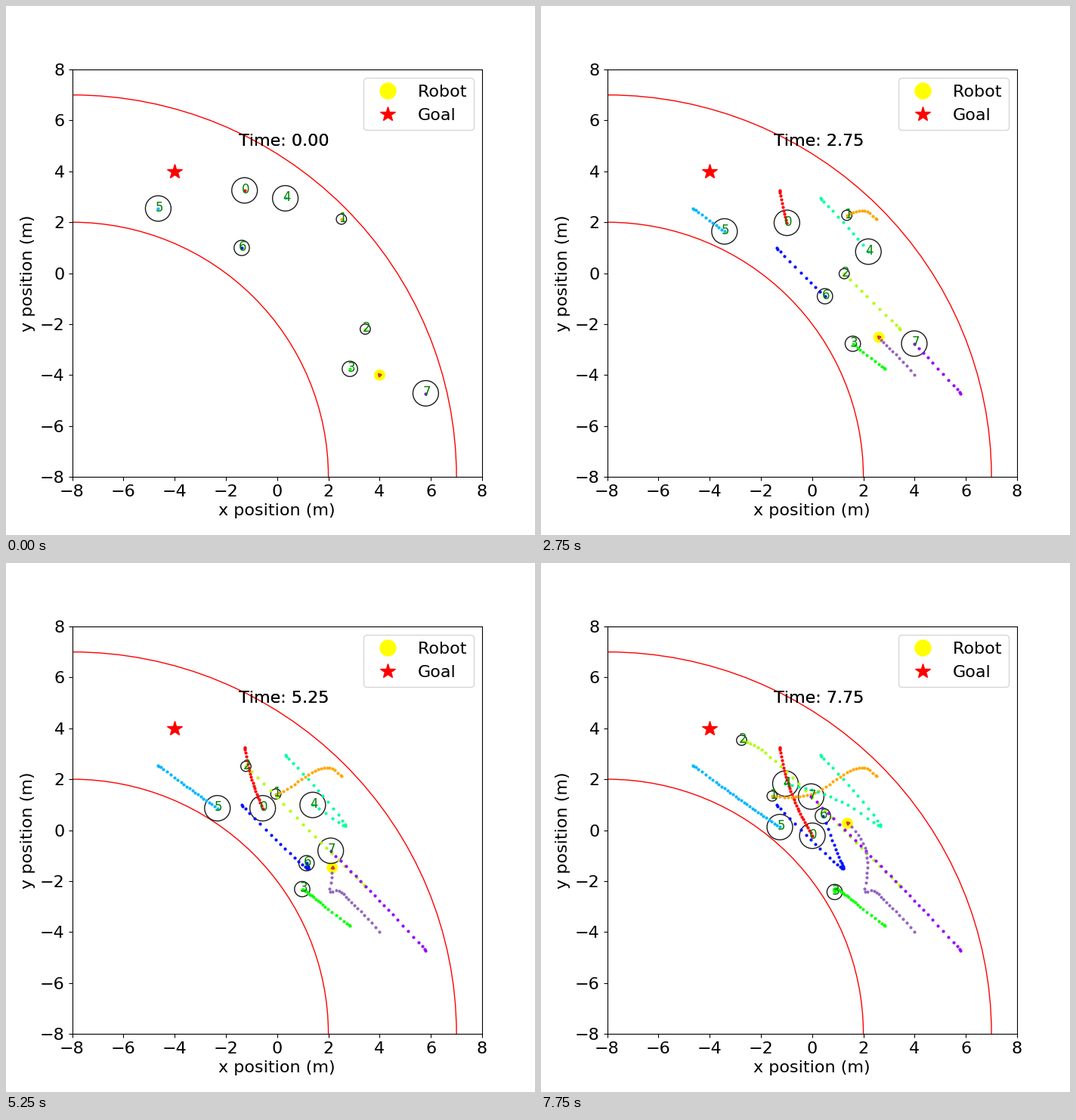
A matplotlib script that plays this animation: 700 by 700 pixels, repeating every 8000 ms.

```python
import numpy as np
import matplotlib.pyplot as plt
from matplotlib.animation import FuncAnimation

STEPS = 32
STEP_MS = 250

# Match the whole-pixel kerning of the text.
plt.rcParams["text.kerning_factor"] = 6


def walk(*keys, from_rest=True):
    """Smooth path through a few (step, x, y) keys, sampled at every step."""
    keys = np.array(keys, float)
    times, points = keys[:, 0], keys[:, 1:]
    slopes = np.gradient(points, times, axis=0, edge_order=2)
    if from_rest:
        slopes[0] = 0
    steps = np.arange(STEPS)
    i = np.clip(np.searchsorted(times, steps, side="right") - 1,
                0, len(times) - 2)
    span = (times[i + 1] - times[i])[:, None]
    u = (steps - times[i])[:, None] / span
    return ((1 + 2 * u) * (1 - u) ** 2 * points[i]
            + u * (1 - u) ** 2 * span * slopes[i]
            + u ** 2 * (3 - 2 * u) * points[i + 1]
            + u ** 2 * (u - 1) * span * slopes[i + 1])


# Each human: radius and path, in metres.
humans = [
    (.5, walk((0, -1.27, 3.25), (8, -1.08, 2.32), (31, .01, -.22))),
    (.2, walk((0, 2.51, 2.12), (4, 2.15, 2.42), (8, 1.72, 2.42),
              (21, -.05, 1.42), (31, -1.56, 1.34))),
    (.2, walk((0, 3.44, -2.2), (8, 1.92, -.7), (25, -1.98, 3.15),
              (31, -2.75, 3.53))),
    (.3, walk((0, 2.84, -3.76), (8, 1.87, -3), (19, 1.06, -2.36),
              (31, .88, -2.43))),
    (.5, walk((0, .32, 2.94), (8, 1.59, 1.57), (15, 2.66, .16),
              (21, 1.39, .99), (31, -1.04, 1.83))),
    (.5, walk((0, -4.64, 2.54), (8, -3.75, 1.88), (31, -1.26, .12))),
    (.3, walk((0, -1.38, .99), (8, -.04, -.37), (15, 1.09, -1.45),
              (25, .92, -.76), (31, .42, .56))),
    (.5, walk((0, 5.8, -4.72), (8, 4.51, -3.32), (31, -.04, 1.32))),
]
robot_path = walk((0, 4, -4), (8, 2.9, -2.83), (14, 2.31, -2.37),
                  (16, 2.06, -2.42), (19, 2.13, -1.86), (25, 2.06, -.7),
                  (31, 1.38, .27), from_rest=False)
velocity = np.gradient(robot_path, axis=0)
headings = np.degrees(np.arctan2(velocity[:, 1], velocity[:, 0]))

fig, ax = plt.subplots(figsize=(7, 7), dpi=100)
fig.subplots_adjust(left=.125, right=.9, bottom=.11, top=.88)
ticks = range(-8, 9, 2)
ax.set(xlim=(-8, 8), ylim=(-8, 8), xticks=ticks, yticks=ticks)
ax.tick_params(labelsize=16)
ax.set_xlabel("x position (m)", fontsize=16)
ax.set_ylabel("y position (m)", fontsize=16)

# Corridor walls
for r in (10, 15):
    ax.add_patch(plt.Circle((-8, -8), r, fill=False, ec="red", lw=1))

goal, = ax.plot([-4], [4], "*", color="red", ms=15, label="Goal")
robot_key = plt.Line2D([], [], color="yellow", marker="o", ls="", ms=15,
                       label="Robot")
ax.legend(handles=[robot_key, goal], fontsize=16, loc="upper right")

robot = ax.add_patch(plt.Circle(robot_path[0], .2, color="yellow"))


def add_trail(color):
    return ax.plot([], [], "o", color=color, ms=3, mew=0)[0]


hues = plt.get_cmap("hsv", len(humans) + 2)
walkers = []
for n, (r, path) in enumerate(humans):
    circle = ax.add_patch(plt.Circle(path[0], r, fill=False, ec="0.1", lw=1))
    label = ax.text(0, 0, str(n), color="green", fontsize=12)
    walkers.append((path, circle, label, add_trail(hues(n))))
robot_trail = add_trail("tab:purple")
arrow, = ax.plot([], [], color="tab:purple", mec="red", ms=4, mew=.7, ls="")

# Two stacked copies give the heavier clock text.
clocks = [ax.text(-1.5, 5, "", fontsize=16) for _ in range(2)]


def update(step):
    for path, circle, label, trail in walkers:
        circle.center = path[step]
        label.set_position(path[step] - .11)
        trail.set_data(*path[:step + 1].T)
    robot.center = robot_path[step]
    robot_trail.set_data(*robot_path[:step + 1].T)
    arrow.set_data(*robot_path[step:step + 1].T)
    arrow.set_marker((3, 0, headings[step] - 90))
    for clock in clocks:
        clock.set_text(f"Time: {step * STEP_MS / 1000:.2f}")
    return clocks


anim = FuncAnimation(fig, update, frames=STEPS, interval=STEP_MS,
                     repeat=True, repeat_delay=0, blit=False)
plt.show()
```
